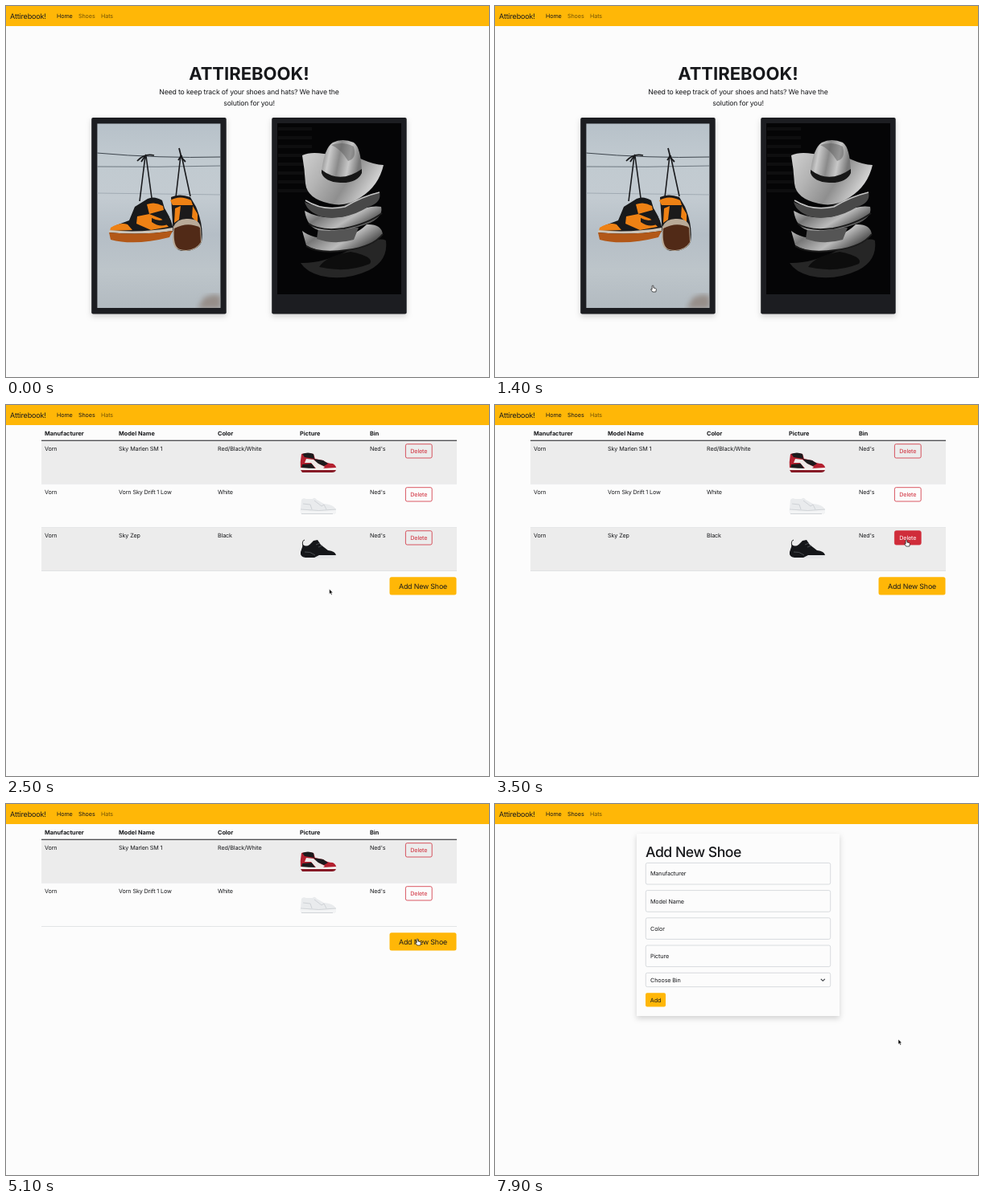
Write an HTML page that moves like this. It is 600 px wide and 462 px high and loops after 8000 ms.

```html
<!DOCTYPE html>
<html lang="en">
<head>
<meta charset="utf-8">
<title>Attirebook!</title>
<style>
  html, body { margin: 0; height: 100%; overflow: hidden; background: #fcfcfc; }
  svg { display: block; width: 600px; height: 462px; font: 7.2px Inter, "Open Sans", sans-serif;
    letter-spacing: -.12px; fill: #17181b; text-rendering: geometricPrecision; }
  .card { filter: drop-shadow(0 3.7px 3.7px rgba(0,0,0,.17)); }
  .bold { font-weight: 700; font-size: 7.3px; letter-spacing: 0; }
  .lead { font-size: 8.7px; letter-spacing: -.16px; }
  .brand { font-size: 9px; letter-spacing: -.15px; }
  .big { font-size: 8.8px; letter-spacing: -.15px; }
  .title { font-size: 22px; font-weight: 700; letter-spacing: 0; }
  .head { font-size: 17.6px; font-weight: 500; letter-spacing: -.45px; }
  .mid { text-anchor: middle; }
</style>
</head>
<body>
<svg id="stage" viewBox="0 0 600 462"></svg>
<script>
const YELLOW = '#ffb707', RED = '#d02c3a', CARD = '#1c1d21';

const text = (x, y, s, cls = '', more = '') => `<text x="${x}" y="${y}" class="${cls}" ${more}>${s}</text>`;
const rect = (x, y, w, h, fill, more = '') =>
  `<rect x="${x}" y="${y}" width="${w}" height="${h}" fill="${fill}" ${more}/>`;
const path = (d, fill, more = '') => `<path d="${d}" fill="${fill}" ${more}/>`;
const line = (d, color, width) => path(d, 'none', `stroke="${color}" stroke-width="${width}"`);
const group = (id, body, more = '') => `<g id="${id}" ${more}>${body}</g>`;
const gradient = (id, stops, dir = 'x2="0" y2="1"') => `<linearGradient id="${id}" ${dir}>` +
  stops.map((c, i) => `<stop offset="${i / (stops.length - 1)}" stop-color="${c}"/>`).join('') +
  '</linearGradient>';

const defs = `<defs>
  ${gradient('sky', ['#b7c1c9', '#c1cad0', '#c3cbd1', '#b5bec6', '#bdc5ca', '#b2bac0'])}
  ${gradient('felt', ['#d0d0d0', '#b4b4b4', '#8f8f8f', '#d8d8d8'], 'x2="1" y2=".4"')}
  ${gradient('crown', ['#6f6f6f', '#cacaca', '#8a8a8a', '#c8c8c8', '#777'], 'x2="1" y2=".2"')}
  ${gradient('brim', ['#d5d5d5', '#777', '#bbb', '#444'], 'x2="1" y2=".5"')}
  <filter id="soft"><feGaussianBlur stdDeviation="3"/></filter>
  <clipPath id="frame"><path d="M113.4 146.4h153v229.6h-153z"/></clipPath>
</defs>`;

const shoesPhoto = `<g clip-path="url(#frame)">` +
  rect(113, 146, 154, 231, 'url(#sky)') +
  path('M238 377 246 363 258 359 267 361V377Z', '#968e89', 'filter="url(#soft)"') +
  line('M113 183 Q190 190 267 188', '#3d454d', 1) +
  line('M113 200 Q190 201 267 199', '#59636b', .8) +
  line('M113 233 267 235', '#98a3ab', .8) +
  line('M173 187 166 243M174 187 181 239M217 186 211 238M218 186 229 237', '#1a1b1e', 1.6) +
  line('M163 193 Q172 183 184 186M174 185 168 194M215 177 218 189 223 194M214 192 218 186', '#1a1b1e', 1.8) +
  // side view
  path('M176 240 Q184 236 194 242 L197 252 Q206 266 208 279 L203 286 Q165 292 129 284 Q128 277 137 273 L153 267 160 250Z', '#18191b') +
  path('M175 247 Q185 243 195 249 L196 254 178 259Z M130 276 Q142 269 151 272 L157 279 129 280Z M163 262 178 259 193 265 202 275 180 279 162 271Z', '#ee8114') +
  path('M181 264 Q194 271 202 261 L205 269 Q194 278 181 269Z', '#1d1c1c') +
  path('M128 279 Q167 283 207 276 L207 280 Q168 286 128 282Z', '#cbc4b9') +
  path('M128 282 Q168 286 207 280 L203 288 Q160 299 130 291Z', '#b25818') +
  // seen from below
  path('M205 238 Q215 233 229 238 L236 250 Q246 274 243 294 Q237 306 218 305 Q207 303 208 286Z', '#1b1a1b') +
  path('M204 242 Q216 235 230 242 L232 248 207 248Z M210 252 217 249 215 266 209 270Z M232 249 238 259 238 270 231 263Z', '#ee8114') +
  path('M208 275 Q213 264 226 265 Q240 265 242 276 L243 294 Q235 308 216 304 Q207 302 207 290Z', '#b9aa98') +
  path('M209 277 Q226 268 241 276 L242 294 Q234 307 216 303 Q207 300 209 277Z', '#512a17') +
  '</g>';

const blinds = Array.from({ length: 8 }, (_, i) => rect(338, 151 + i * 11, 42, 4, '#0e0e0f')).join('');
const hatsPhoto = rect(337, 146, 154, 213, '#050506') + blinds +
  path('M366 320 Q392 321 424 305 Q462 286 472 292 Q475 317 451 329 Q421 343 391 336 Q373 331 366 320Z', '#262626') +
  path('M389 325 Q398 311 428 306 Q458 312 452 321 Q423 333 389 325Z', '#0d0d0d') +
  path('M368 280 Q380 290 405 290 Q432 288 448 272 Q466 271 468 284 Q456 300 423 304 Q389 309 373 298Z', 'url(#brim)') +
  path('M388 276 H438 L432 291 Q408 298 386 290Z', '#555') +
  path('M371 255 Q392 267 421 262 Q448 247 466 250 Q469 263 450 271 Q420 282 388 279 Q374 275 371 255Z', 'url(#brim)') +
  path('M371 244 Q391 254 419 249 Q444 235 464 232 Q467 245 450 250 Q422 268 391 262 Q374 256 371 244Z', '#484848') +
  line('M372 242 Q394 256 421 250 Q443 237 464 232', '#c6c6c6', 1.5) +
  line('M373 299 Q389 309 423 304 Q456 300 468 284M376 271 Q390 281 420 277 Q450 271 467 258', '#1b1b1b', 2) +
  path('M368 186 Q378 181 395 184 L440 190 Q458 198 469 198 Q463 224 441 238 Q423 251 402 246 Q374 240 372 221 Q371 203 368 186Z', 'url(#felt)') +
  path('M392 207 Q395 177 406 170 Q418 164 432 170 Q441 176 442 207 Q435 221 415 220 Q397 219 392 207Z', 'url(#crown)') +
  path('M392 204 Q415 222 442 203 L442 208 Q436 221 415 220 Q396 219 392 208Z', '#171717') +
  path('M404 173 Q419 168 432 175 Q436 190 425 193 Q416 178 404 173Z', '#555', 'opacity=".45"');

const home = text(302, 92, 'ATTIREBOOK!', 'title mid') +
  text(302, 110, 'Need to keep track of your shoes and hats? We have the', 'lead mid') +
  text(302, 124, 'solution for you!', 'lead mid') +
  [106.2, 330.2].map(x => rect(x, 139, 167.5, 244.6, CARD, 'rx="2" class="card"')).join('') +
  shoesPhoto + hatsPhoto;

// Thumbnails, each drawn from its own top left corner
const highTop = path('M2 2 Q9 0 17 2 L19 8 29 10 Q34 14 41 14 Q46 17 45 21 H1 Q0 12 2 2Z', '#b3202f') +
  path('M3 2 Q10 -1 17 2 L18 8 6 6Z M17 8 29 10 35 14 30 17 22 14Z M3 15 15 14 19 20H2Z', '#1c1a1c') +
  path('M8 8 17 9 23 14 31 18 29 20H20L14 13 6 13Z', '#eee9e7') +
  path('M1 19 Q20 21 45 19 V22 H1Z', '#f6f3f0') + path('M1 22 H45 Q44 25 40 25 H3Z', '#871b27');
const lowTop = path('M2 3 Q4 0 8 2 L16 2 Q18 -1 21 3 L30 8 Q42 9 45 15 V19 Q44 21 40 21 H3 Q0 20 1 14Z', '#e9ebed') +
  path('M1 15 Q24 18 45 15 V19 Q44 21 40 21 H3 Q0 20 1 15Z', '#f3f4f5') +
  line('M1 15 Q24 18 45 15M18 4 27 11 30 9M4 8 13 9 15 15M30 9 33 15M2 20.5H41', '#c3c8cc', .7);
const runner = line('M4 9 Q2 2 6 1', '#222', 1) +
  path('M1 17 Q5 14 12 16 L28 19 45 19 Q46 23 40 24 H8 Q0 23 1 17Z', '#e4e5e7') +
  path('M4 7 Q8 10 12 7 L17 2 22 1 26 7 35 14 Q44 15 45 20 H24 L18 23 H7 Q0 22 1 16Z', '#151619') +
  line('M20 7 25 5M23 10 28 8M6 16 Q13 15 19 20', '#55585c', .8);

const rows = [
  ['Sky Marlen SM 1', 'Red/Black/White', highTop, 14.5],
  ['Vorn Sky Drift 1 Low', 'White', lowTop, 16.5],
  ['Sky Zep', 'Black', runner, 14.5]
].map(([model, color, shoe, top], i) => group('row' + i,
  rect(44, 0, 516, 54, i % 2 ? '#fcfcfc' : '#ececec') + rect(44, 53.6, 516, .7, '#d9dbde') +
  ['Vorn', model, color].map((s, c) => text([48, 140, 263][c], 12.5, s)).join('') +
  text(452, 12.5, "Ned's") +
  `<g class="pic" transform="translate(365 ${top})">${shoe}</g>` +
  rect(496.4, 4.2, 32.8, 17.3, 'none', `id="box${i}" rx="2" stroke="${RED}" stroke-width=".8"`) +
  text(512.8, 15.6, 'Delete', 'mid', `id="del${i}" fill="${RED}"`),
  `transform="translate(0 ${44.5 + 54 * i})"`)).join('');

const table = ['Manufacturer', 'Model Name', 'Color', 'Picture', 'Bin']
  .map((s, i) => text([48, 140, 263, 365, 452][i], 37.6, s, 'bold')).join('') + rows +
  rect(44, 43.7, 516, 1.1, '#2b2b2e') +
  group('add', rect(476.5, 214.3, 83, 22.3, YELLOW, 'id="addBox" rx="2.5"') +
    text(518, 228.8, 'Add New Shoe', 'big mid'));

const field = (y, h, label) => rect(187.3, y, 229.4, h, '#fcfcfc', 'rx="2" stroke="#cfd2d6" stroke-width=".8"') +
  text(193, y + h / 2 + 2.7, label);
const form = rect(176, 37, 252, 227, '#fcfcfc', 'class="card"') +
  text(187, 65.5, 'Add New Shoe', 'head') +
  ['Manufacturer', 'Model Name', 'Color', 'Picture'].map((s, i) => field(73.4 + 34.2 * i, 26.6, s)).join('') +
  field(210.3, 17.4, 'Choose Bin') + line('M404.8 217.8 407.3 220.3 409.8 217.8', '#33373b', 1.1) +
  rect(187, 235.2, 25, 17.4, YELLOW, 'rx="2"') + text(199.5, 246.6, 'Add', 'mid');

const nav = rect(0, 0, 600, 25, YELLOW) + text(5, 16, 'Attirebook!', 'brand') +
  text(63, 15.4, 'Home') + text(90, 15.4, 'Shoes', '', 'id="shoesLink"') +
  text(118, 15.4, 'Hats', '', 'fill="#735406"');

const cursor = path('M0 0V6.2L1.4 5 2.4 7.2 3.5 6.7 2.5 4.5H4.4Z', '#000', 'id="arrow" stroke="#fff" stroke-width=".5"') +
  path('M-.9 .9Q-.9 0 0 0T.9 .9V3L3.5 3.6Q4.5 4 4.3 5.4L3.8 8H-.3L-2.4 4.8Q-2 3.8-.9 5Z', '#fff',
    'id="hand" stroke="#111" stroke-width=".7"');

const $ = id => document.getElementById(id);
$('stage').innerHTML = defs + rect(0, 0, 600, 462, '#fcfcfc') + nav +
  group('home', home) + group('table', table) + group('form', form) + group('cursor', cursor);

// Pointer moves: start time, end time, target x, y
const moves = [[0, 900, 196, 348], [1400, 1500, 195, 345], [1800, 3500, 511, 168],
  [5700, 6200, 516, 190], [6200, 6600, 517, 178], [6700, 7100, 503, 310], [7800, 7900, 501, 293]];

function pointer(t) {
  let x = 170, y = 380;
  for (const [from, to, tx, ty] of moves) {
    const k = Math.min(1, Math.max(0, (t - from) / (to - from))), e = k * (2 - k);
    x += (tx - x) * e;
    y += (ty - y) * e;
  }
  return [x, y];
}

const show = (el, on) => { el.style.display = on ? '' : 'none'; };
const pics = document.querySelectorAll('.pic');

function draw(now) {
  const t = Math.floor(now % 8000 / 100) * 100;
  const page = t < 1500 ? 'home' : t < 6800 ? 'table' : 'form';
  const deleted = t >= 4300;
  const [x, y] = pointer(t);
  const inside = (l, top, r, b) => x >= l && x <= r && y >= top && y <= b;
  const onDelete = page === 'table' && !deleted && inside(496, 156, 530, 174);
  const onAdd = page === 'table' && deleted && inside(476, 160, 560, 183);
  const onCard = page === 'home' && inside(106, 139, 274, 384);

  for (const id of ['home', 'table', 'form']) show($(id), id === page);
  pics.forEach(p => show(p, t >= 1600));
  show($('row2'), !deleted);
  $('add').setAttribute('transform', `translate(0 ${deleted ? -54 : 0})`);
  $('addBox').setAttribute('fill', onAdd && t >= 5800 ? '#ffc22b' : YELLOW);
  $('box2').setAttribute('fill', onDelete ? RED : 'none');
  $('del2').setAttribute('fill', onDelete ? '#fff' : RED);
  $('shoesLink').setAttribute('fill', t < 1600 ? '#735406' : '#17181b');

  const hand = onDelete || onAdd || onCard;
  show($('cursor'), t >= 100);
  show($('hand'), hand);
  show($('arrow'), !hand);
  $('cursor').setAttribute('transform', `translate(${x} ${y})`);
  requestAnimationFrame(() => draw(performance.now() - start));
}
const start = performance.now();
draw(0);
</script>
</body>
</html>
```
